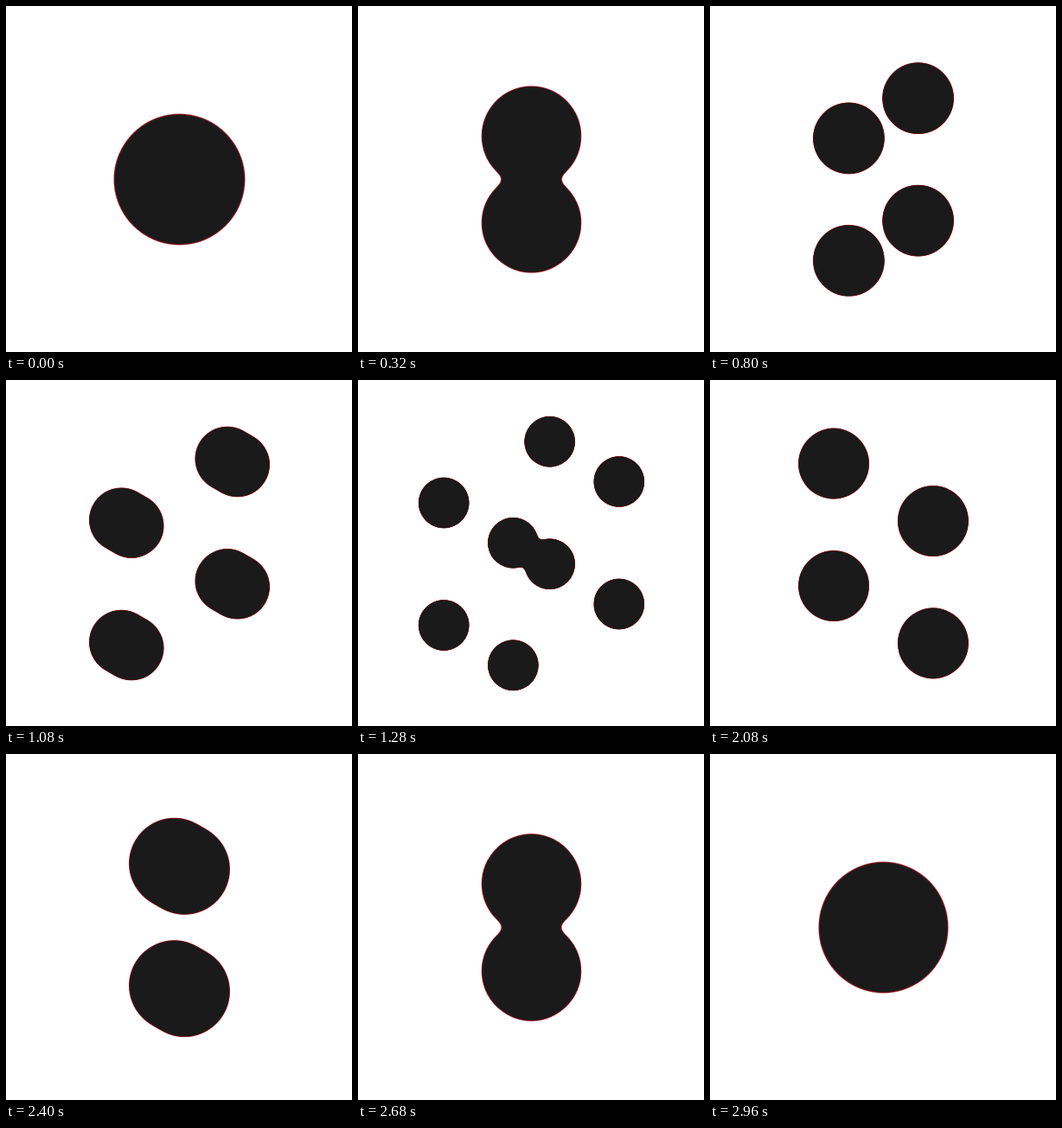
These frames come from a looping animation (400x400 px, 3000 ms). An HTML page:

```html
<!DOCTYPE html>
<html lang="en">
<head>
<meta charset="utf-8">
<title>Splitting drops</title>
<style>
  html, body { margin: 0; width: 100%; height: 100%; overflow: hidden; background: #fff; }
  svg { display: block; width: 100%; height: 100%; }
</style>
</head>
<body>
<svg viewBox="0 0 400 400">
  <!-- Blur, then threshold twice: a dark red body and a slightly smaller black one on top -->
  <filter id="goo" filterUnits="userSpaceOnUse" x="0" y="0" width="400" height="400" color-interpolation-filters="sRGB">
    <feGaussianBlur id="blur" stdDeviation="6" result="soft"/>
    <feColorMatrix in="soft" result="rim" values="0 0 0 0 .5  0 0 0 0 .06  0 0 0 0 .09  0 0 0 16 -6.2"/>
    <feColorMatrix in="soft" result="body" values="0 0 0 0 .102  0 0 0 0 .102  0 0 0 0 .102  0 0 0 16 -7.2"/>
    <feMerge><feMergeNode in="rim"/><feMergeNode in="body"/></feMerge>
  </filter>
  <g id="drops" filter="url(#goo)"></g>
</svg>
<script>
const LOOP = 3000, STEP = 40, CENTER = 200.5, REACH = 70.7;
const RADII = [75, 57, 41, 29.4]; // for 1, 2, 4 and 8 drops

// Each split moves along its own axis: opens from t0 to t1, closes from t2 to t3
const splits = [
  { angle: -90, times: [0, 502, 2500, 3000] },
  { angle: -30, times: [500, 1000, 1483, 1990] },
  { angle: 30, times: [980, 1480, 2000, 2500] }
].map(s => ({
  x: REACH * Math.cos(s.angle * Math.PI / 180),
  y: REACH * Math.sin(s.angle * Math.PI / 180),
  times: s.times
}));

const drops = document.getElementById('drops');
const blur = document.getElementById('blur');
const circles = Array.from({ length: 8 }, () =>
  drops.appendChild(document.createElementNS('http://www.w3.org/2000/svg', 'circle')));

const ease = (t, from, to) => {
  const u = Math.min(1, Math.max(0, (t - from) / (to - from)));
  return (1 - Math.cos(Math.PI * u)) / 2;
};

function radiusAt(level) {
  const i = Math.min(2, Math.floor(level));
  return RADII[i] + (RADII[i + 1] - RADII[i]) * (level - i);
}

function draw(t) {
  const open = splits.map(({ times: [a, b, c, d] }) => ease(t, a, b) - ease(t, c, d));
  // Drops shrink quickly as soon as they start to part
  const level = open.reduce((sum, s) => sum + 1 - Math.max(0, 1 - s) ** 3.5, 0);
  const r = radiusAt(level);
  blur.setAttribute('stdDeviation', 1.3 + 0.09 * r);
  circles.forEach((circle, i) => {
    let x = CENTER, y = CENTER;
    splits.forEach((s, j) => {
      const side = i >> j & 1 ? 1 : -1;
      x += side * s.x * open[j];
      y += side * s.y * open[j];
    });
    circle.setAttribute('cx', x);
    circle.setAttribute('cy', y);
    circle.setAttribute('r', r - 0.7);
  });
}

function tick() {
  const t = performance.now() % LOOP;
  draw(Math.floor(t / STEP) * STEP);
  requestAnimationFrame(tick);
}
tick();
</script>
</body>
</html>
```
